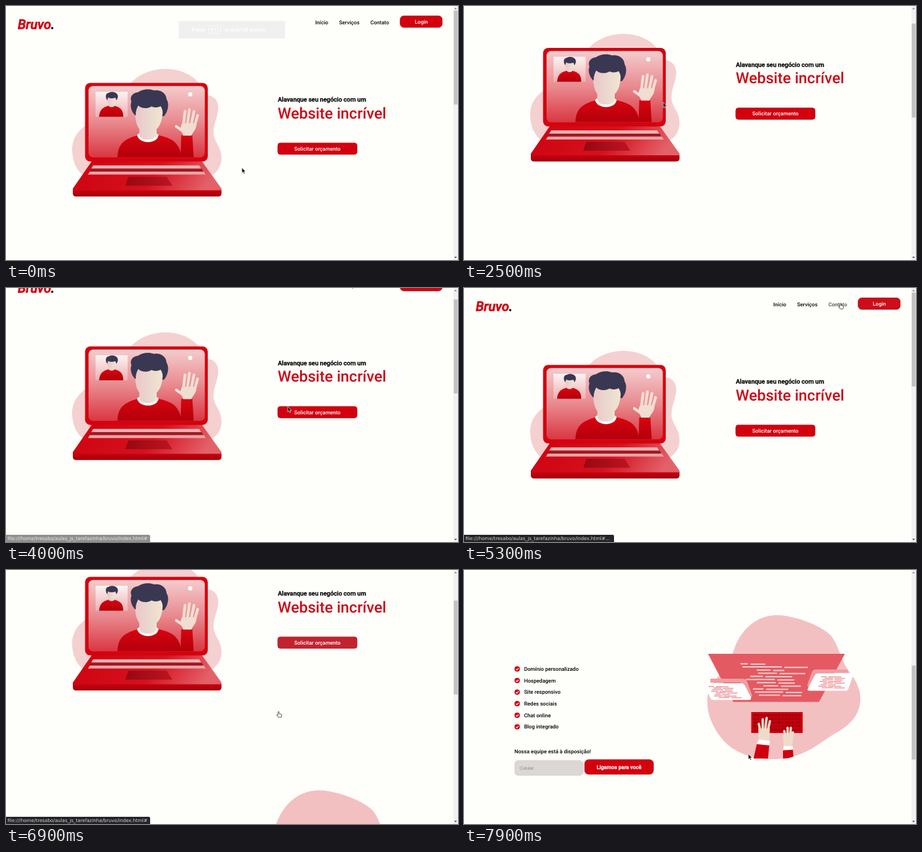
Recreate the animation shown at these times as an HTML page. Size 690x388 px, loop 8000 ms.

```html
<!DOCTYPE html>
<html lang="pt-BR">
<head>
<meta charset="utf-8">
<title>Website incrível</title>
<style>
  html, body { margin: 0; width: 100%; height: 100%; overflow: hidden; background: #fefefb; }
  svg { display: block; width: 690px; height: 388px; }
  text { font: 500 8.08px Roboto, sans-serif; white-space: pre; text-rendering: geometricPrecision; }
  .white { fill: #fff; }
  .mid { text-anchor: middle; }
  .bold { stroke: currentColor; stroke-width: .35px; }
  .button { stroke: #b0000c; stroke-width: .7px; }
  .logo { font-size: 20.2px; font-style: italic; fill: #cf0814; stroke: #cf0814; stroke-width: .8px; }
  .lead { font-size: 9.455px; }
  .title { font-size: 23.4px; fill: #c90a18; }
  .hint { font: 6.8px "Liberation Sans", Arial, sans-serif; fill: #8d8886; }
  #status text { font: 7.13px "DejaVu Sans", sans-serif; fill: #d6d6d6; }
</style>
</head>
<body>
<svg viewBox="0 0 690 388">
  <defs>
    <linearGradient id="screen" x2="0" y2="1">
      <stop stop-color="#f4cccd"/><stop offset=".5" stop-color="#e88a8f"/><stop offset="1" stop-color="#da3641"/>
    </linearGradient>
    <linearGradient id="thumbBg" x2="0" y2="1"><stop stop-color="#fdf3f2"/><stop offset="1" stop-color="#efb0b3"/></linearGradient>
    <linearGradient id="deck" x2="1" y2=".15">
      <stop stop-color="#cd0310"/><stop offset=".6" stop-color="#d5111d"/><stop offset="1" stop-color="#e3626a"/>
    </linearGradient>
    <linearGradient id="edge" x2="0" y2="1"><stop stop-color="#c9020f"/><stop offset="1" stop-color="#a2000b"/></linearGradient>
    <linearGradient id="pad" x2="1"><stop stop-color="#960812"/><stop offset="1" stop-color="#bb1520"/></linearGradient>
    <linearGradient id="shirt" x2="0" y2="1"><stop stop-color="#d8040f"/><stop offset="1" stop-color="#b3000b"/></linearGradient>
    <linearGradient id="skin"><stop stop-color="#ecc6c8"/><stop offset=".55" stop-color="#ead9cf"/><stop offset="1" stop-color="#f2e6d0"/></linearGradient>
  </defs>

  <g id="page">
    <text class="logo" x="18" y="35">Bruvo<tspan fill="#111" stroke="#111">.</tspan></text>
    <text id="home" x="472" y="27.7">Início</text>
    <text id="services" x="508.4" y="27.7">Serviços</text>
    <text id="contact" x="556.2" y="27.7">Contato</text>
    <rect id="login" class="button" x="601.7" y="15.1" width="64.2" height="17.6" rx="5.5"/>
    <text class="white mid" x="634" y="26.7">Login</text>

    <text class="lead bold" x="415" y="146">Alavanque seu negócio com um</text>
    <text class="title" x="414.7" y="171.8">Website incrível</text>
    <rect id="quote" class="button" x="414.9" y="209.2" width="121" height="17.5" rx="4"/>
    <text class="white mid" x="475.3" y="220.9">Solicitar orçamento</text>

    <path fill="#f5d0d0" d="M190 118C205 102 225 96 245 96C268 97 286 106 296 120L306 136C317 137 324 144 324 155C324 170 315 182 317 197C319 209 329 216 329 232C329 248 318 262 300 262H130C112 262 101 240 101 220C101 200 112 190 122 182Z"/>
    <path fill="url(#deck)" d="M131 237H299L329 279V284H102V279Z"/>
    <path fill="url(#edge)" d="M102 281.500H329V286Q329 291 324 291H107Q102 291 102 286Z"/>
    <path fill="#efb3b4" d="M133 243.500H295L298 248.500H130Z"/>
    <path fill="#9c1a22" d="M130 248.500H299L301 253H128Z"/>
    <path fill="#eca2a5" d="M128 253H302L305 257.500H125Z"/>
    <path fill="url(#pad)" d="M187 261H245L254 274.500H182Z"/>
    <rect x="120.700" y="117.500" width="187.300" height="120" rx="8" fill="#d3030f"/>
    <rect x="126" y="122.300" width="177.500" height="109" rx="7" fill="url(#screen)"/>
    <circle cx="281.300" cy="135" r="3.200" fill="#fff"/>

    <rect x="136.700" y="131" width="49" height="38.300" fill="url(#thumbBg)"/>
    <path fill="url(#shirt)" d="M142 169.300C143 158 148 155 156 152.500H166C174 155 179 158 179 169.300Z"/>
    <path fill="url(#skin)" d="M154.500 139H168.500C168.500 146 167 149 165 150L165.500 153Q161 156 157 153V150C155 148 154.500 145 154.500 139Z"/>
    <path fill="#3a3752" d="M154.500 144C151 139 152 133 157 132.500C162 130 168 132 170 135C172 139 170 142 168.500 144L167 140C162 142 158 141 156 139.500Z"/>

    <path fill="url(#shirt)" d="M170 231C171 213 177 204 201 197.500H233C255 202 265 210 268 231Z"/>
    <path fill="url(#shirt)" d="M267.500 197.500H284.500L286.500 231H266.500Z"/>
    <path fill="#fff" d="M200 197L204 194H229L233 197C231 211.500 203 211.500 200 197Z"/>
    <path fill="url(#skin)" d="M197 146H239.500C240 166 238 181 230 188V196C229 207 204 207 203.500 196V188C198 181 196 168 197 146Z"/>
    <path fill="#3a3752" d="M197 167C191 161 189 152 191.500 146C188 137 196 132 201 132C208 127 218 126 226 129C236 127 245 134 245 142C250 150 247 162 241 168.500L238.500 168C240 162 239 158 236 153C230 156 226 155 222 153.500C214 158 206 156 202 152C199 157 198 161 198 167Z"/>
    <g fill="#f1ddd1" stroke="#f1ddd1" stroke-linecap="round" stroke-width="4.300">
      <path stroke="none" d="M268.500 179L291 179C291 189 286 191 283 198H270.500C270 194 266 191 266 187Z"/>
      <path d="M271 181L273.300 161M277 180L280 158.500M283 180L287 161M288.500 181L292.500 167M270 191L260 184"/>
    </g>

    <g transform="translate(0 374.500)">
      <g id="list"></g>
      <text x="77" y="280">Nossa equipe está à disposição!</text>
      <rect x="77" y="290.500" width="105.300" height="23.700" rx="6" fill="#dcd6d5"/>
      <text class="hint" x="85" y="304.700">Celular</text>
      <rect class="button" x="184.200" y="289.700" width="105" height="22.400" rx="6" fill="#d3010e"/>
      <text class="white mid bold" color="#fff" x="236.700" y="303.500">Ligamos para você</text>

      <path fill="#f3c0c2" d="M477 69C505 69 545 85 560 100C572 115 576 140 588 155C600 170 606 185 605 200C603 225 585 240 566 250C545 262 520 288 475 289C440 290 410 278 394 258C376 236 369 212 372 192C376 172 402 150 412 122C420 98 440 70 477 69Z"/>
      <path fill="#e45a62" d="M372.500 128H581.500L542 201.500H411Z"/>
      <g id="code" stroke="#f7cccd" stroke-width="2"></g>
      <path fill="#ee9ea2" d="M376 166H425Q430 166 432 170L440 192L436 198L422 172H376Z"/>
      <path fill="#fff" d="M371.500 173H423Q427 173 429 177L438 194Q439 198.500 435 198.500H378Q371 190 371.500 173Z"/>
      <path fill="#ee9ea2" d="M585 152H537Q533 152 531 156L524 176L527 183L540 157H587Z"/>
      <path fill="#fff" d="M541 157.500H592Q595 157.500 594 161L587 181Q586 184.500 582 184.500H528Q523 184.500 525 181L536 160Q538 157.500 541 157.500Z"/>
      <g id="cards" stroke="#e4777d" stroke-width="1.100"></g>
      <rect x="438.500" y="217" width="78.500" height="32" fill="#cf000d"/>
      <path id="keys" stroke="#a3000b" stroke-width="4" stroke-dasharray="4.300 1"/>
      <g fill="none" stroke="#eedccb" stroke-linecap="round" stroke-width="3.600">
        <path d="M452 244L450 235M456 242L456 228M460 242L462 226M464 244L467 231M490 254L489 246M494 253L494 241M498 253L499 241M501 256L502 248"/>
        <path fill="#eedccb" d="M451 244H465L464 262H452ZM489 254H501L499 270H490Z"/>
      </g>
      <path fill="#fff" d="M450 259L467 261L466 268L447 266ZM488 269H502V276H487Z"/>
      <path fill="#cf000d" d="M447 266L466 268L464 288H442ZM487 275.500L502 274.500L503 285Q496 288 487 288Z"/>
    </g>
  </g>

  <g id="toast">
    <rect x="263.500" y="22.700" width="162.500" height="27" rx="3" fill="#f0f0f0"/>
    <rect x="309.500" y="30" width="18" height="12" rx="1.500" fill="none" stroke="#fafafa"/>
    <text class="white" x="283.500" y="39">Press    F11    to exit full screen</text>
  </g>

  <rect x="683" width="7" height="388" fill="#f1f1f1"/>
  <path fill="#8a8a8a" d="M684.300 5L686.300 2.600L688.300 5Z"/>
  <path fill="#505050" d="M684.300 383L686.300 385.400L688.300 383Z"/>
  <rect id="thumb" x="683.600" width="5.800" height="143.500" fill="#c1c1c1"/>

  <g id="status">
    <path id="statusBox" fill="#242528"/>
    <text id="address" x="2.300" y="385"></text>
  </g>

  <g id="cursor">
    <path id="arrow" fill="#1c1c1c" stroke="#fff" stroke-width=".6" d="M0 0V8.300L2 6.500L3.400 9.500L4.700 8.900L3.400 6H6Z"/>
    <path id="hand" fill="#fff" stroke="#333" stroke-width=".8" stroke-linejoin="round" d="M-.8 .8Q0 -.6 .9 .8V3.500L4 4.200Q5 4.500 4.800 6L4.200 9H-.2L-2.800 5.800Q-2.400 4.600 -.8 5.800Z"/>
  </g>
</svg>

<script>
const $ = id => document.getElementById(id);
const LOOP = 8000, STEP = 100;
const ADDRESS = "file:///home/tresabo/aulas_js_tarefazinha/bruvo/index.html#";

// Rows of time followed by values
const SCROLL = [[2200, 0], [2300, 17], [2400, 41], [2500, 53.5], [3900, 53.5], [4000, 28.3], [4100, 7],
  [4200, 0], [6600, 0], [6700, 34], [6800, 82], [6900, 107], [7200, 107], [7300, 138], [7400, 176],
  [7600, 260], [7800, 350], [7900, 374.5]];
const POINTER = [[700, 360, 247], [1100, 300, 170], [1400, 247, 138], [1500, 247, 138], [1700, 304, 147],
  [2700, 304, 147], [3500, 425, 166], [3800, 430, 181], [4000, 430, 181], [4300, 520, 100], [4700, 635, 24],
  [5100, 625, 25], [5300, 574.5, 23], [5600, 524, 24], [6000, 482, 24], [6200, 482, 24], [6500, 416, 216],
  [7000, 416, 216], [7400, 434, 281]];
const STATUS = [[3000, 0], [3100, 1], [3900, 1], [4100, 0], [4500, 0], [4600, 1], [7300, 1], [7500, 0]];

const RED = [211, 1, 14], RED_HOVER = [193, 36, 48], INK = [10, 10, 10], INK_HOVER = [105, 105, 105];
const HOVERS = {
  quote: [[3100, 3700], [6500, 7000]], login: [[4600, 5100]],
  contact: [[5200, 5500]], services: [[5500, 5800]], home: [[5900, 6300]]
};

const clamp = v => Math.max(0, Math.min(1, v));
const mix = (a, b, k) => a.map((v, i) => v + (b[i] - v) * k);

function track(rows, t) {
  const next = rows.findIndex(row => row[0] > t);
  if (next < 0) return rows.at(-1).slice(1);
  if (next === 0) return rows[0].slice(1);
  const a = rows[next - 1], b = rows[next];
  return mix(a, b, (t - a[0]) / (b[0] - a[0])).slice(1);
}

function buildArt() {
  const items = ["Domínio personalizado", "Hospedagem", "Site responsivo", "Redes sociais", "Chat online", "Blog integrado"];
  $("list").innerHTML = items.map((label, i) => {
    const y = 151.2 + i * 17.67;
    return `<circle cx="81.2" cy="${y}" r="4.1" fill="#cc0715"/>
      <path d="M79.2 ${y + .1}l1.5 1.5 2.700-2.900" fill="none" stroke="#fff" stroke-width="1.1"/>
      <text x="91.7" y="${y + 2.9}">${label}</text>`;
  }).join("");

  const dash = (x, y, w) => `<path d="M${x} ${y}h${w}"/>`;
  const starts = [422, 425, 447, 449, 437, 430, 447, 457, 441, 444, 450];
  const lengths = [38, 100, 42, 72, 64, 74, 58, 57, 54, 72, 65];
  $("code").innerHTML = starts.map((x, i) => {
    const y = 143.3 + i * 4.8, first = lengths[i] * (.3 + .1 * (i * 3 % 4));
    return dash(x, y, first) + dash(x + first + 4, y + .6, lengths[i] - first - 4);
  }).join("");

  const card = (left, top, slant) => Array.from({ length: 8 }, (_, i) => {
    const x = left + i * slant + i * 5 % 3 * 3, y = top + i * 2.4, w = 9 + i * 7 % 5 * 2;
    return dash(x, y, w) + dash(x + w + 2, y + .3, 20 - i % 3 * 4);
  }).join("");
  $("cards").innerHTML = card(373, 178, 1.4) + card(545, 163, -.7);
  $("keys").setAttribute("d", [222, 227.5, 233, 238.5, 244].map(y => `M441.5 ${y}H514`).join(""));
}

function draw(now) {
  const t = Math.floor(now % LOOP / STEP) * STEP;
  const [scroll] = track(SCROLL, t), [x, y] = track(POINTER, t);
  $("page").setAttribute("transform", `translate(0 ${-scroll})`);
  $("thumb").setAttribute("y", 7 + scroll * .371);
  $("toast").setAttribute("opacity", clamp(1 - t / 200));

  let hovering = false;
  for (const [id, spans] of Object.entries(HOVERS)) {
    const level = Math.max(...spans.map(([from, to]) => Math.min(clamp((t - from + 100) / 300), clamp(1 - (t - to) / 300))));
    const button = id === "quote" || id === "login";
    $(id).setAttribute("fill", `rgb(${button ? mix(RED, RED_HOVER, level) : mix(INK, INK_HOVER, level)})`);
    hovering ||= spans.some(([from, to]) => t >= from && t < to);
  }

  $("cursor").setAttribute("transform", `translate(${x} ${y})`);
  $("arrow").setAttribute("visibility", hovering ? "hidden" : "visible");
  $("hand").setAttribute("visibility", hovering ? "visible" : "hidden");

  const shortened = t >= 4600 && t < 6500;
  $("status").setAttribute("opacity", track(STATUS, t)[0]);
  $("address").textContent = ADDRESS + (shortened ? "…" : "");
  $("statusBox").setAttribute("d", `M0 377H${shortened ? 227 : 218}q2 0 2 2V388H0Z`);
  requestAnimationFrame(draw);
}

buildArt();
requestAnimationFrame(draw);
</script>
</body>
</html>
```
